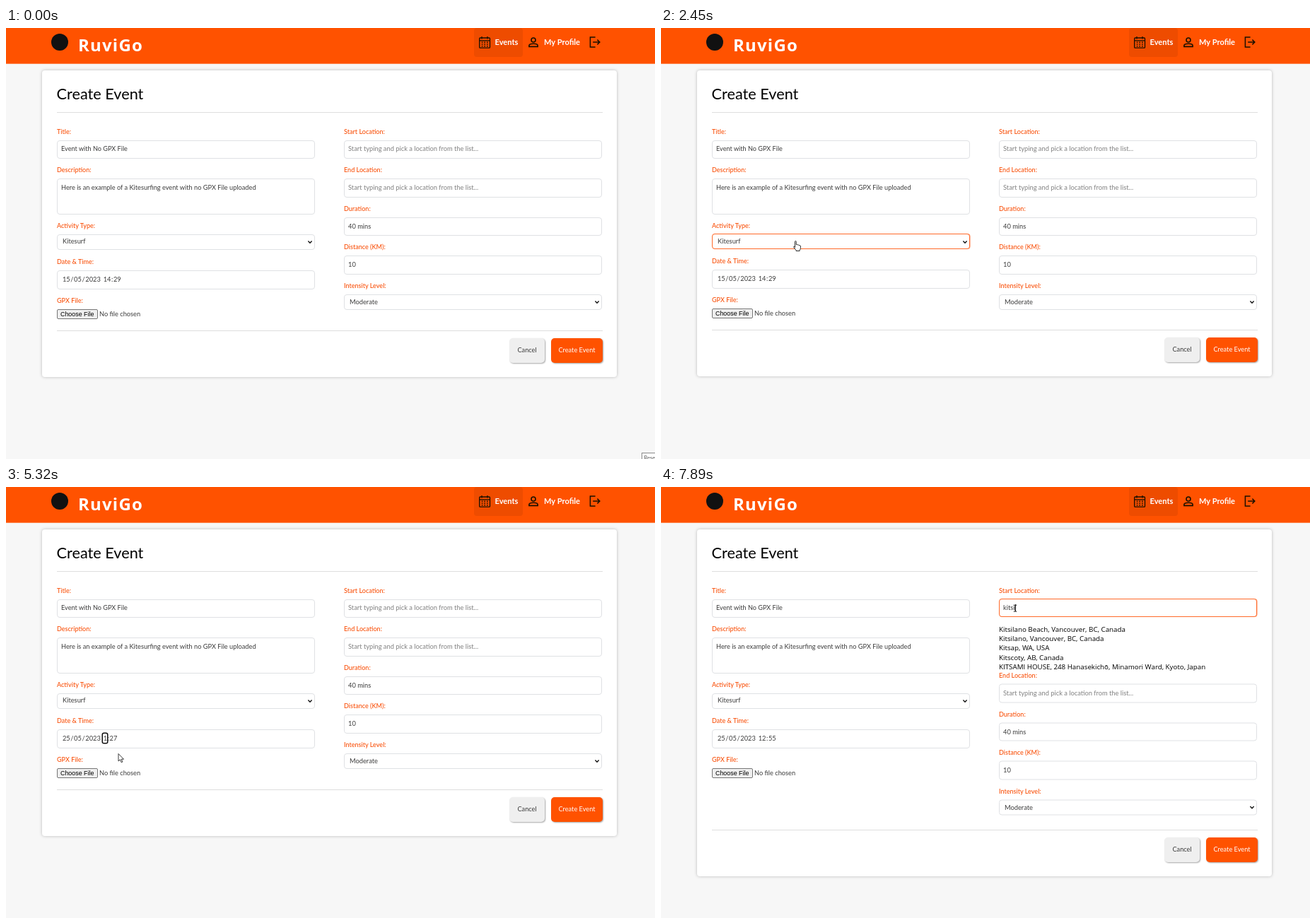
An HTML page for the animation above (8000 ms loop, 918 by 610 pixels).

```html
<!DOCTYPE html>
<html lang="en">
<head>
<meta charset="utf-8">
<title>Create Event</title>
<style>
html, body { margin: 0; width: 100%; height: 100%; overflow: hidden; background: #f7f7f7; }
#stage { position: absolute; left: 0; top: 0; width: 918px; height: 610px; overflow: hidden; background: #f7f7f7; font-family: Lato, "Open Sans", sans-serif; }
#stage div, #stage svg { position: absolute; box-sizing: border-box; }
.text { line-height: 16px; white-space: pre; color: #3c3c3c; }
.field { background: #fff; border: 1px solid #dfe1e4; border-radius: 4px; }
.field.focus { border-color: #ff6a2a; margin-top: -1px; box-shadow: .5px 0 0 #ff9a70; }
.label { color: #f9500a; font-weight: 500; }
.rule { height: 1px; background: #dedede; }
.group { left: 0; top: 0; width: 0; height: 0; }
.date { display: flex; }
.date span { height: 13px; line-height: 13px; margin-top: 1.5px; padding: 0 .3px; border-radius: 1.5px; }
.date .on { box-shadow: 0 0 0 1.5px #111; }
.date .sel { background: #3584e8; color: #fff; }
.arial { font-family: "Liberation Sans", Arial, sans-serif; }
.mid { text-align: center; }
</style>
</head>
<body>
<div id="stage"></div>
<script>
const stage = document.getElementById('stage');
const LOOP = 8000;

function box(parent, x, y, w, h, css = '', cls = '') {
  const el = document.createElement('div');
  el.className = cls;
  el.style.cssText = `left:${x}px;top:${y}px;width:${w}px;height:${h}px;${css}`;
  parent.append(el);
  return el;
}
// y is the middle of the line
function text(parent, x, y, size, str, css = '', cls = '') {
  const el = document.createElement('div');
  el.className = 'text ' + cls;
  el.style.cssText = `left:${x}px;top:${y - 8}px;font-size:${size}px;${css}`;
  el.textContent = str;
  parent.append(el);
  return el;
}
function svg(parent, x, y, w, h, body) {
  const holder = document.createElement('div');
  holder.innerHTML = `<svg width="${w}" height="${h}" viewBox="0 0 ${w} ${h}" fill="none" style="overflow:visible">${body}</svg>`;
  const el = holder.firstChild;
  el.style.left = x + 'px';
  el.style.top = y + 'px';
  parent.append(el);
  return el;
}
const group = parent => box(parent, 0, 0, 0, 0, '', 'group');
const label = (p, x, y, s) => text(p, x, y, 9.05, s, '', 'label');
const field = (p, x, y, h) => box(p, x, y, 365, h, '', 'field');
const rule = (p, y) => box(p, 72, y, 771.5, 1, '', 'rule');
const chevron = (p, x, y) => svg(p, x - 3, y - 2, 6, 4, '<path d="M.4 .6 3 3.2 5.6.6" stroke="#111" stroke-width="1.4"/>');
const show = (el, on) => { el.style.display = on ? '' : 'none'; };
const move = (el, y) => { el.style.transform = `translateY(${y}px)`; };

// Header
box(stage, 0, 0, 918, 51, 'background:linear-gradient(#ff5200 50px, #fd8a52 50px)');
box(stage, 64, 8, 24, 24, 'background:#111;border-radius:50%');
text(stage, 102, 24, 24, 'RuviGo', 'color:#fff;font-family:"Noto Sans","Open Sans",sans-serif;font-weight:600;letter-spacing:1.2px');
box(stage, 662, 0, 69, 41, 'background:#ee4c00;border-radius:4px');
let dots = '';
for (let i = 0; i < 9; i++) dots += `<path d="M${3.8 + i % 3 * 3.6} ${8.2 + (i / 3 | 0) * 2.8}h1.6" stroke-width="1.4"/>`;
svg(stage, 669, 12, 16, 17, `<g stroke="#1a1000" stroke-width="1.3"><rect x=".7" y="2" width="14.8" height="14.2" rx="1"/><path d="M.7 5.8h14.8M4 0v3.5M12 0v3.5"/>${dots}</g>`);
text(stage, 691.5, 20, 11.1, 'Events', 'color:#fff;font-weight:700');
svg(stage, 739, 13, 14, 15, '<g stroke="#1a1000" stroke-width="1.6"><circle cx="7" cy="4" r="3"/><path d="M.9 13.4V11.6Q1.2 9.4 7 9.3T13.1 11.6V13.4Z"/></g>');
text(stage, 761, 20, 11.1, 'My Profile', 'color:#fff;font-weight:700');
svg(stage, 825, 12, 16, 16, '<g stroke="#1a1000" stroke-width="1.5"><path d="M8.6 1H1.4V15H8.6M5.2 8H14.6M11.4 4.6 14.8 8 11.4 11.4"/></g>');

// Card
const card = box(stage, 51, 60, 813, 434, 'background:#fff;border-radius:4px;box-shadow:0 0 4px rgba(0,0,0,.25)');
text(stage, 71.6, 93, 21.7, 'Create Event', 'color:#000');
rule(stage, 119);

// Left column
label(stage, 72, 147, 'Title:');
field(stage, 72, 159, 26);
text(stage, 78, 171, 9.15, 'Event with No GPX File');
label(stage, 72, 201, 'Description:');
field(stage, 72, 213, 51);
text(stage, 78, 226, 9.23, 'Here is an example of a Kitesurfing event with no GPX File uploaded');
label(stage, 72, 280, 'Activity Type:');
const activity = field(stage, 72, 292, 22);
text(stage, 80, 302.3, 9.3, 'Kitesurf');
chevron(stage, 430, 303);

const lower = group(stage);
label(lower, 72, 330.5, 'Date & Time:');
field(lower, 72, 343, 27);
const dateRow = text(lower, 79.6, 355.6, 9.3, '', '', 'date');
const parts = Array.from({ length: 8 }, () => {
  const s = document.createElement('span');
  dateRow.append(s);
  return s;
});
parts[5].style.marginLeft = '3.2px';
label(lower, 72, 386, 'GPX File:');
box(lower, 72, 398, 58, 14, 'background:#efefef;border:1px solid #767676;border-radius:2px');
text(lower, 77, 405.3, 8.9, 'Choose File', 'color:#000', 'arial');
text(lower, 132, 405.3, 9.25, 'No file chosen');

// Footer
const foot = group(stage);
rule(foot, 428);
const button = (x, w, css, s) => {
  box(foot, x, 439, w, 35, 'border-radius:5px;box-shadow:1px 1px 2px rgba(0,0,0,.35);' + css);
  text(foot, x, 456, 9.2, s, `width:${w}px;${css}background:none`, 'mid');
};
button(712, 50, 'background:#efefef;color:#3c3c3c;', 'Cancel');
button(771, 73, 'background:#ff5200;color:#fff;', 'Create Event');

// Right column
const HINT = 'Start typing and pick a location from the list...';
label(stage, 478, 147, 'Start Location:');
const start = field(stage, 478, 159, 26);
const typed = text(stage, 484, 171.2, 9.3, '');
const caret = document.createElement('span');
caret.style.cssText = 'display:inline-block;width:1px;height:10px;background:#111;vertical-align:-2px;margin-right:-1px';

const places = group(stage);
['Kitsilano Beach, Vancouver, BC, Canada', 'Kitsilano, Vancouver, BC, Canada', 'Kitsap, WA, USA', 'Kitscoty, AB, Canada',
  'KITSAMI HOUSE, 248 Hanasekichō, Minamori Ward, Kyoto, Japan'].forEach((s, i) =>
  text(places, 478, 201.5 + i * 13.35, 9.78, s, 'color:#000;font-family:"Open Sans","Noto Sans",sans-serif'));

const right = group(stage);
[['End Location:', HINT], ['Duration:', '40 mins'], ['Distance (KM):', '10']].forEach(([name, value], i) => {
  const y = 201 + i * 54.5;
  label(right, 478, y, name);
  field(right, 478, y + 12.3, 26.5);
  text(right, 484, y + 25, 9.3, value, i ? '' : 'color:#808080');
});
label(right, 478, 365, 'Intensity Level:');
field(right, 478, 377, 22);
text(right, 486, 387.7, 9.3, 'Moderate');
chevron(right, 836, 388);

// Activity list
const menu = box(stage, 72, 313.5, 365.5, 115.5, 'box-shadow:0 1px 4px rgba(0,0,0,.45)');
const options = box(menu, 0, 0, 365.5, 115.5, 'background:#fff');
['Run', 'Walk', 'Hike', 'Cycle', 'Kitesurf', 'Swim', 'Row', 'Other'].forEach((s, i) => {
  const on = s === 'Kitesurf';
  if (on) box(options, 0, i * 14.4, 365.5, 14.4, 'background:#1a6fd6');
  text(options, 8, 7.4 + i * 14.4, 9.3, s, on ? 'color:#fff' : '');
});

// Calendar
const COL = 31.65, ROW = 30.4;
const calendar = box(stage, 73, 370, 222, 206, 'background:#fff;border-radius:4px;overflow:hidden');
const calShadow = box(stage, 73, 370, 222, 206, 'border-radius:4px;box-shadow:0 0 4px rgba(0,0,0,.33)');
const calText = (x, y, w, size, s, css) => text(calendar, x, y, size, s, `width:${w}px;${css}`, 'arial mid');
box(calendar, 0, 0, 88.5, 28, 'background:#f0f0f0');
['«', '‹', '', '›', '»'].forEach((s, i) => calText(i * 44.3, 14.5, 44.3, 9.5, s, `color:${i < 2 ? '#aaa' : '#111'}`));
calText(88.6, 14.5, 44.3, 8.8, 'May', 'color:#111');
calText(88.6, 24, 44.3, 8.8, '2023', 'color:#111');
['MON', 'TUE', 'WED', 'THU', 'FRI', 'SAT', 'SUN'].forEach((s, i) =>
  calText(i * COL, 44, COL, 6.9, s, 'color:#111;font-weight:700;text-decoration:underline dotted 1px;text-underline-offset:1px'));
const cells = [];
for (let i = 0; i < 35; i++) {
  const x = i % 7 * COL, y = 53.3 + (i / 7 | 0) * ROW;
  cells.push(box(calendar, x, y, COL + .1, ROW + .1));
  const color = i === 14 ? '#fff' : i > 30 ? '#757575' : i % 7 > 4 ? '#c8391b' : i < 14 ? '#a6a6a6' : '#111';
  calText(x, y + 14.5, COL, 8.6, i < 31 ? i + 1 : i - 30, `color:${color}`);
}

// Tooltip at the corner
const tip = box(stage, 899, 600.5, 40, 14, 'background:#fff;border:1px solid #8a8a8a');
text(tip, 2.5, 7.5, 7.5, 'Rese', 'color:#555');

// Pointer
const glow = box(stage, -8, -6, 16, 16, 'background:#ffec4f;opacity:.85;border-radius:50%');
const pointers = {
  arrow: svg(stage, 0, 0, 9, 14, '<path d="M.5.5V11L3 8.8 4.7 12.8 6.4 12 4.7 8.2H8Z" fill="#fff" stroke="#222" stroke-width=".9"/>'),
  hand: svg(stage, -3, 0, 11, 15, '<path d="M2.5 9.5V1.3Q2.5.5 3.4.5T4.3 1.3V5.5Q6.2 5 6.3 6 8.2 5.6 8.3 6.6 10.4 6.4 10.4 8V10.5Q10.4 12 9.2 13.3V14.5H4V13.3L.8 9.6Q.2 8.2 1.4 8.2Z" fill="#fff" stroke="#222" stroke-width=".95"/>'),
  beam: svg(stage, -3, -5, 6, 10, '<path d="M.8.5H2.5L3 .9 3.5.5H5.2M3 .9V9.1M.8 9.5H2.5L3 9.1 3.5 9.5H5.2" stroke="#222" stroke-width="1"/>')
};

const path = [
  [160, 880, 592], [400, 560, 430], [640, 163, 260], [840, 312, 178], [1000, 235, 190], [1140, 170, 225], [1290, 170, 226],
  [1700, 168, 275], [2000, 168, 304], [2090, 168, 304], [2300, 190, 301], [2560, 190, 301], [2950, 87, 357], [3220, 87, 357],
  [3430, 173, 529], [3680, 173, 529], [3810, 181, 529], [4060, 181, 529], [4750, 141, 353], [5250, 141, 353],
  [5320, 158.5, 377], [5420, 158.5, 377], [5540, 166, 377], [6160, 166, 377], [6650, 501, 171.7]
];
const kinds = [[0, ''], [160, 'arrow'], [800, 'beam'], [1320, 'arrow'], [1880, 'hand'], [2650, 'arrow'], [2850, 'beam'],
  [3300, 'hand'], [3970, 'arrow'], [4680, 'beam'], [5300, 'arrow'], [6600, 'beam']];
const words = [[0, ''], [7280, 'k'], [7350, 'ki'], [7510, 'kit'], [7590, 'kits'], [7740, 'kitsi']];
const hours = [[0, '14'], [5320, '1'], [5400, '12']];
const minutes = [[0, '29'], [3970, '27'], [6000, '5'], [6070, '55']];
// [time, active part, whether it is selected]
const marks = [[0, -1, 0], [2980, 0, 1], [3970, -1, 0], [4820, 5, 1], [5320, 5, 0], [5400, 7, 1], [6000, 7, 0], [6220, -1, 0]];

const row = (table, t) => table.findLast(r => r[0] <= t);
const during = (t, a, b) => t >= a && t < b;

function place(t) {
  const i = path.findIndex(p => p[0] > t);
  if (i === 0) return path[0].slice(1);
  if (i < 0) return path[path.length - 1].slice(1);
  const a = path[i - 1], b = path[i], k = (t - a[0]) / (b[0] - a[0]);
  return [a[1] + (b[1] - a[1]) * k, a[2] + (b[2] - a[2]) * k];
}

function draw(t) {
  show(tip, t < 160);

  const picking = during(t, 1990, 2980);
  const searching = t >= 6680;
  const listed = t >= 7740;
  const shift = picking ? -1 : listed ? 57 : 0;
  activity.classList.toggle('focus', picking);
  move(lower, picking ? -1 : 0);
  move(foot, shift);
  card.style.height = 434 + shift + 'px';
  show(menu, during(t, 2050, 2450));
  show(options, t >= 2150);

  const [, active, selected] = row(marks, t);
  const day = t < 3970 ? '15' : '25';
  [day, '/', '05', '/', '2023', row(hours, t)[1], ':', row(minutes, t)[1]].forEach((s, i) => {
    parts[i].textContent = s;
    parts[i].className = i === active ? (selected ? 'on sel' : 'on') : '';
  });

  start.classList.toggle('focus', searching);
  const word = row(words, t)[1];
  typed.textContent = word || HINT;
  typed.style.color = word ? '#3c3c3c' : '#808080';
  if (searching && !during(t, 7040, 7280)) word ? typed.append(caret) : typed.prepend(caret);
  show(places, listed);
  move(right, listed ? 65.5 : searching ? -1 : 0);

  const [x, y] = place(t);
  const open = during(t, 3060, 3970);
  show(calendar, open);
  show(calShadow, open);
  const col = Math.floor((x - 73) / COL), line = Math.floor((y - 423.3) / ROW);
  const hover = line < 0 ? -1 : line * 7 + col;
  cells.forEach((c, i) => {
    c.style.background = i === 14 ? '#f6c9b5' : i < 14 ? '#f0f0f0' : i === hover ? '#e6e6e6' : '#fff';
  });

  const kind = row(kinds, t)[1];
  for (const k in pointers) {
    show(pointers[k], k === kind);
    pointers[k].style.transform = `translate(${x}px,${y}px)`;
  }
  glow.style.transform = `translate(${x}px,${y - (kind === 'beam' ? 2 : 0)}px)`;
  show(glow, [[1990, 2150], [2300, 2440], [2950, 3060], [4760, 4880], [6600, 6720]].some(([a, b]) => during(t, a, b)));
}

const begin = performance.now();
function tick() {
  draw((performance.now() - begin) % LOOP);
  requestAnimationFrame(tick);
}
tick();
</script>
</body>
</html>
```
